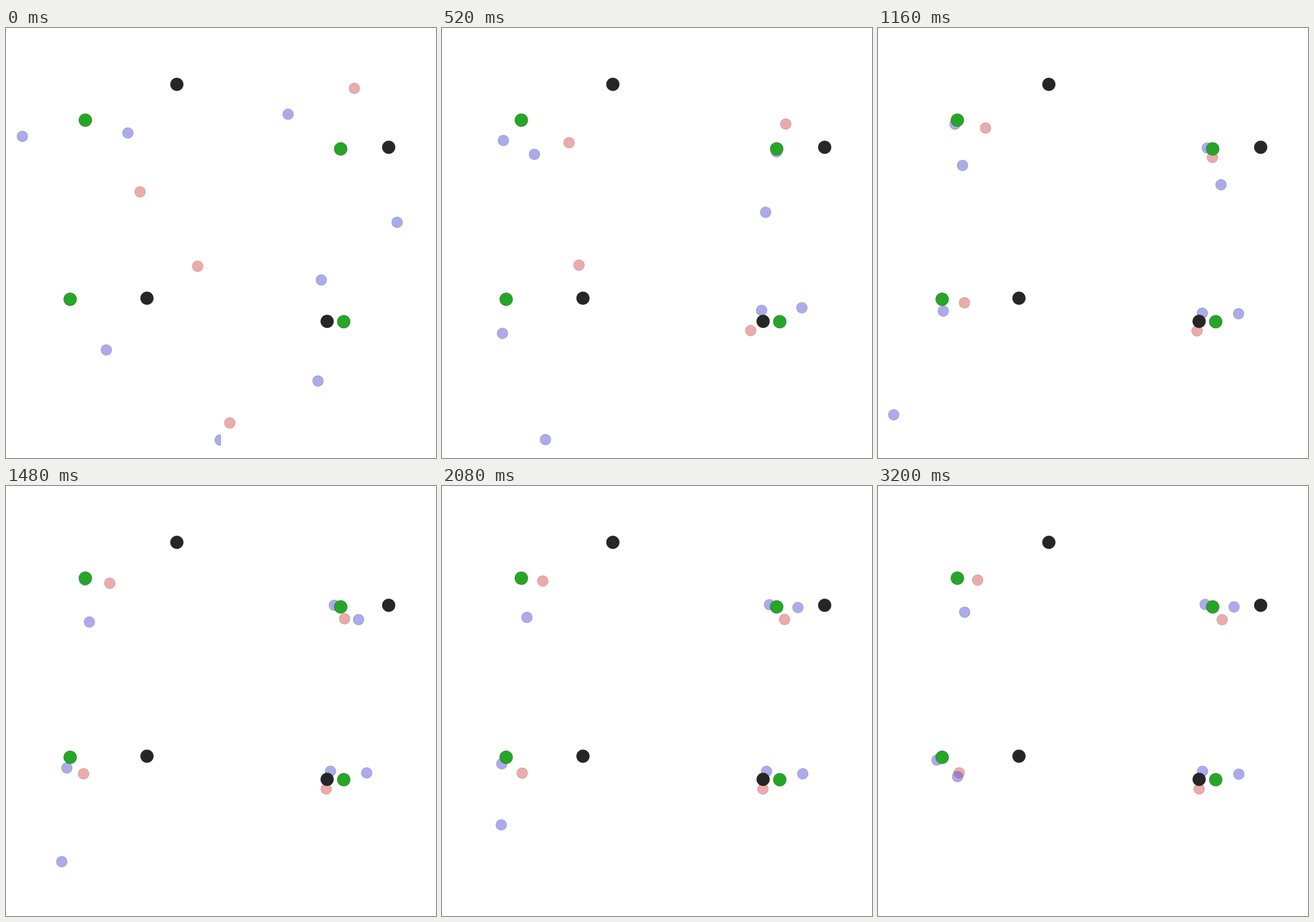
Animation, 748 px wide and 748 px high, one loop 3240 ms. Source, as a matplotlib script:

```python
import numpy as np
import matplotlib.pyplot as plt
from matplotlib.animation import FuncAnimation
from matplotlib.patches import Polygon, Rectangle

SIZE, FRAMES, INTERVAL = 748, 81, 40
ARRIVE = 13  # step at which every agent ends its first dash
AGENT_R, MARK_R = 0.025 * SIZE / 2, 0.03 * SIZE / 2
RED, BLUE = (0.85, 0.35, 0.35), (0.35, 0.35, 0.85)
GREEN, BLACK = (0.15, 0.65, 0.15), (0.15, 0.15, 0.15)

angles = 2 * np.pi * np.arange(30) / 30
RING = np.column_stack([np.cos(angles), np.sin(angles)])

fig = plt.figure(figsize=(SIZE / 100, SIZE / 100), dpi=100, facecolor="white")
ax = fig.add_axes([0, 0, 1, 1])
ax.set(xlim=(0, SIZE), ylim=(SIZE, 0))
ax.axis("off")


def disc(center, radius, color, alpha, z):
    rim = tuple(c / 2 for c in color) + (alpha / 2,)
    patch = Polygon(RING * radius + center, closed=True, facecolor=color + (alpha,),
                    edgecolor=rim, linewidth=0.72, zorder=z)
    return ax.add_patch(patch)


def hermite(p, q, mp, mq, u):
    return (p * (1 + 2 * u) * (1 - u) ** 2 + q * u ** 2 * (3 - 2 * u)
            + mp * u * (1 - u) ** 2 - mq * u ** 2 * (1 - u))


def travel(start, dash, home, turns, tau):
    """Dash from rest, pass the turns, then settle exponentially at home."""
    keys = np.array([(0, *start), (ARRIVE, *dash), *turns], float)
    t, p = keys[:, 0], keys[:, 1:]
    home = np.array(home)
    h = np.diff(t)[:, None]
    d = np.diff(p, axis=0) / h

    # Slopes: slow launch, harmonic means at turns, decay rate at the end
    a, b = d[:-1], d[1:]
    same = a * b > 0
    mean = np.where(same, 2 * a * b / np.where(same, a + b, 1), 0)
    m = np.vstack([0.3 * d[:1], mean, (home - p[-1:]) / tau])

    n = np.arange(FRAMES)
    i = np.clip(np.searchsorted(t, n, side="right") - 1, 0, len(d) - 1)
    u = ((n - t[i]) / h[i, 0])[:, None]
    moving = hermite(p[i], p[i + 1], h[i] * m[i], h[i] * m[i + 1], u)
    rest = np.maximum(n - t[-1], 0)[:, None]
    settling = home + (p[-1] - home) * np.exp(-rest / tau)
    return np.where(rest > 0, settling, moving)


agents = []


def agent(color, start, dash, home, turns=(), tau=13):
    patch = disc(start, AGENT_R, color, 0.5, 2 if color == BLUE else 1)
    agents.append((patch, travel(start, dash, home, turns, tau)))
    return patch


agent(RED, (606, 105), (598, 167), (599, 232.7), [(21, 577.5, 212), (37, 589, 231)])
agent(RED, (233.3, 285), (221, 199.5), (173, 163.5))
agent(RED, (333.5, 414.5), (238.3, 412.5), (141.5, 499), [(37, 135, 500.5)])
agent(RED, (389.3, 687), (537, 526.3), (558.6, 527), tau=9)

agent(BLUE, (28.5, 188.5), (106.8, 195.7), (139.5, 161.5), tau=9)
agent(BLUE, (212, 182.7), (160.8, 219.8), (154, 210),
      [(21, 152.5, 239), (37, 145, 236.6)], tau=42)
agent(BLUE, (174.5, 560), (105.2, 531.2), (101.5, 473),
      [(21, 120.8, 492.7), (37, 105.8, 490.5)], tau=28)
agent(BLUE, (490.7, 150), (582, 215.5), (569, 206))
agent(BLUE, (680.4, 338), (563, 320.6), (619.4, 210.3),
      [(21, 577, 305.8), (37, 613.3, 232.4)], tau=5)
agent(BLUE, (548.5, 438.3), (556, 491.2), (564.5, 496.3), tau=5)
agent(BLUE, (542.7, 614), (626, 486.7), (627.7, 501.4))
roamer = agent(BLUE, (372.5, 716.7), (180, 716), (150, 478),
               [(21, 48.7, 713.3), (28, 25, 676), (37, 97, 653.5), (52, 103, 589.5)],
               tau=20)
# The roamer only shows in the left half of the stage
roamer.set_clip_path(Rectangle((0, 0), SIZE / 2, SIZE, transform=ax.transData))

for spot in ((138, 160.3), (582.2, 210.3), (111.6, 471.9), (587.5, 510.9)):
    disc(spot, MARK_R, GREEN, 1.0, 3)
for spot in ((297.2, 98), (665.7, 207.5), (245.2, 470), (558.6, 510.3)):
    disc(spot, MARK_R, BLACK, 1.0, 3)


def update(n):
    for patch, track in agents:
        patch.set_xy(RING * AGENT_R + track[n])
    return [patch for patch, _ in agents]


anim = FuncAnimation(fig, update, frames=FRAMES, interval=INTERVAL,
                     repeat=True, repeat_delay=0, blit=False)
plt.show()
```
